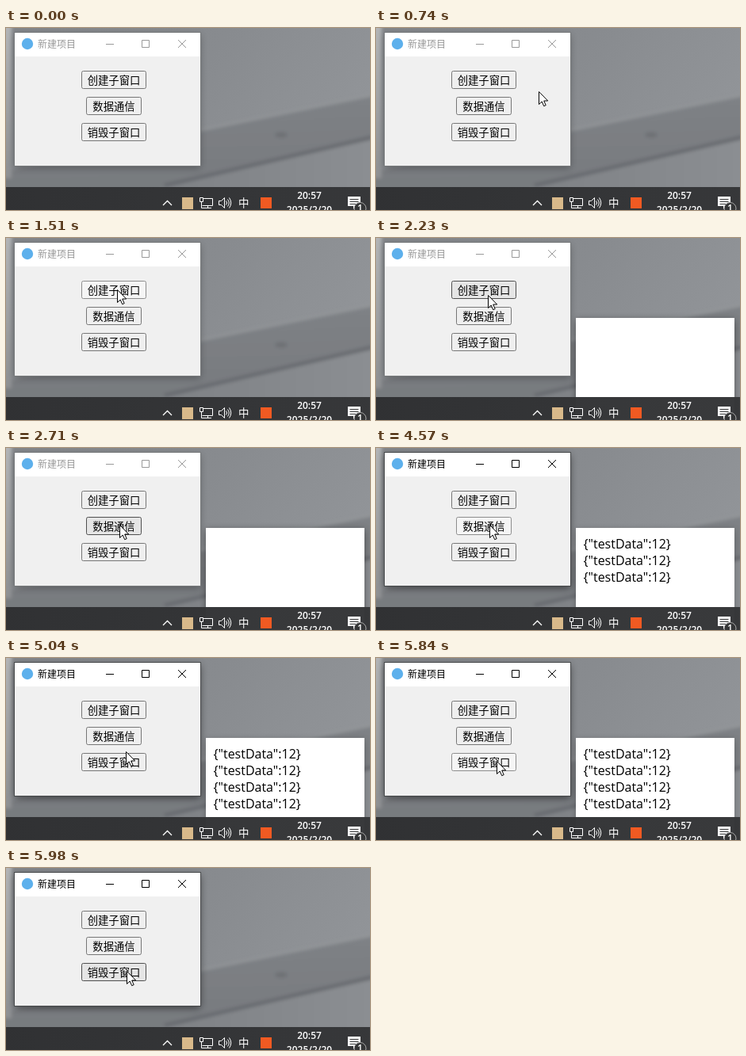
These frames come from a looping animation (459x230 px, 6040 ms). An HTML page:

```html
<!DOCTYPE html>
<html lang="zh-CN">
<head>
<meta charset="utf-8">
<title>新建项目</title>
<style>
  html, body { margin: 0; width: 100%; height: 100%; overflow: hidden; background: #85888b; }
  svg { display: block; width: 459px; height: 230px; }
  text { font-family: "Open Sans", "Noto Sans CJK SC", "Noto Sans CJK", sans-serif; }
  .cjk { font-family: "Noto Sans CJK SC", "Noto Sans CJK", sans-serif; }
  #main { --ink: #999; --edge: #77797b; }
  #main.active { --ink: #000; --edge: #47494b; }
  #main .frame { fill: var(--edge); }
  #main .title { fill: var(--ink); font-size: 12px; }
  #main .controls { fill: none; stroke: var(--ink); }
  .shadow { opacity: .28; }
  .active .shadow { opacity: .5; }
  .button rect { fill: #efefef; stroke: #767676; }
  .button.hover rect { fill: #e5e5e5; stroke: #4f4f4f; }
  .button.pressed rect { fill: #f5f5f5; stroke: #8d8d8d; }
  .button text { font-size: 13.333px; text-anchor: middle; }
  .tray { fill: none; stroke: #fff; }
  .bright { fill: #fff; font-size: 12px; font-weight: 600; text-anchor: middle; }
</style>
</head>
<body>
<svg viewBox="0 0 459 230">
  <defs>
    <linearGradient id="wall" x1="0" y1="0" x2="1" y2=".35">
      <stop offset="0" stop-color="#83868a"/>
      <stop offset=".55" stop-color="#888b8f"/>
      <stop offset="1" stop-color="#919498"/>
    </linearGradient>
    <linearGradient id="band" x1=".5" y1="0" x2=".6" y2="1">
      <stop offset="0" stop-color="#7f8286"/>
      <stop offset="1" stop-color="#75787c"/>
    </linearGradient>
    <linearGradient id="floor">
      <stop offset="0" stop-color="#747679"/>
      <stop offset=".5" stop-color="#808387"/>
      <stop offset="1" stop-color="#8c8f93"/>
    </linearGradient>
    <linearGradient id="glow" x2="0" y2="1">
      <stop offset="0" stop-color="#b4b6b8"/>
      <stop offset="1" stop-color="#8e9092"/>
    </linearGradient>
    <linearGradient id="bar">
      <stop offset="0" stop-color="#2f3032"/>
      <stop offset="1" stop-color="#353638"/>
    </linearGradient>
    <filter id="soft" x="-20%" y="-50%" width="140%" height="200%"><feGaussianBlur stdDeviation="2"/></filter>
    <filter id="blur" x="-20%" y="-20%" width="140%" height="140%"><feGaussianBlur stdDeviation="5"/></filter>
  </defs>

  <rect width="459" height="230" fill="url(#wall)"/>
  <g filter="url(#soft)">
    <path d="M-20 186L244 131 480 83V240H-20Z" fill="url(#band)"/>
    <path d="M240 130L480 81" stroke="#94979a" stroke-width="2"/>
    <path d="M-20 252L254 189 480 136V240H-20Z" fill="url(#floor)"/>
    <path d="M200 199L480 134" stroke="#686b6f" stroke-width="5"/>
    <ellipse cx="347" cy="135" rx="8" ry="3.500" fill="#6e7175"/>
    <rect x="-10" y="-10" width="17" height="200" fill="url(#glow)"/>
  </g>

  <g id="child">
    <rect class="shadow" x="253" y="104" width="198" height="150" filter="url(#blur)"/>
    <rect x="252" y="101" width="200" height="129" fill="#fff"/>
    <g id="lines" font-size="16"></g>
  </g>

  <g id="main">
    <rect class="shadow" x="11" y="9" width="234" height="168" filter="url(#blur)"/>
    <rect class="frame" x="10" y="5" width="236" height="170"/>
    <rect x="11" y="6" width="234" height="30" fill="#fff"/>
    <rect x="11" y="36" width="234" height="138" fill="#f0f0f0"/>
    <circle cx="27" cy="20" r="7.200" fill="#5db0ec"/>
    <text class="title cjk" x="40" y="24.500">新建项目</text>
    <path class="controls" d="M126 20.500H136M171.500 15.500h9v9h-9zM217 15L227 25M227 15L217 25"/>
    <g id="buttons"></g>
  </g>

  <rect y="201" width="459" height="29" fill="url(#bar)" fill-opacity=".98"/>
  <g class="tray">
    <path d="M198 224L203.500 218.500 209 224" stroke-width="1.300"/>
    <path d="M248.500 215.500H260.500V224.500H247.500M254.500 224.500V227.500M250 227.500H259M244.500 214.500H248.500V219.500H244.500ZM246.500 219.500V227.500H250"/>
    <path d="M268.500 218.500H271.500L275.500 214.500V227.500L271.500 223.500H268.500ZM277.500 218.500Q279.500 221 277.500 223.500M279.500 216.500Q283 221 279.500 225.500M281.500 214.500Q286 221 281.500 227.500"/>
  </g>
  <rect x="222" y="214" width="14" height="15" fill="#d9b98a"/>
  <rect x="321" y="214" width="14" height="14" fill="#f15a22"/>
  <text class="cjk" x="293" y="226" font-size="13.500" fill="#fff">中</text>
  <text class="bright" x="382.500" y="216">20:57</text>
  <text class="bright" x="382.500" y="234">2025/2/20</text>
  <path d="M431 213H447V225H442L438 229V225H431Z" fill="#fff"/>
  <path d="M433.500 216.500H444.500M433.500 219.500H444.500M433.500 222.500H441" stroke="#343536"/>
  <circle cx="446.500" cy="228" r="7.500" fill="#343536" stroke="#aaa"/>
  <text class="bright" x="446.500" y="232">1</text>

  <path id="cursor" d="M.5.5V16.500L4.200 13 6.700 18.700 9.200 17.600 6.700 12H11.700Z" fill="#fff" stroke="#000"/>
</svg>
<script>
const LOOP = 6040;
const TICK = 67.5;   // pointer positions advance in ticks
const H = 23;        // button height
const $ = id => document.getElementById(id);

function add(parent, tag, attrs, text = '') {
  const node = document.createElementNS('http://www.w3.org/2000/svg', tag);
  for (const key in attrs) node.setAttribute(key, attrs[key]);
  node.textContent = text;
  parent.append(node);
  return node;
}

const buttons = ['创建子窗口', '数据通信', '销毁子窗口'].map((label, i) => {
  const w = label.length > 4 ? 82 : 70;
  const x = 136 - w / 2, y = 54 + 33 * i;
  const node = add($('buttons'), 'g', { class: 'button' });
  add(node, 'rect', { x: x + .5, y: y + .5, width: w - 1, height: H - 1, rx: 2 });
  add(node, 'text', { class: 'cjk', x: 136, y: y + 16.5 }, label);
  return { node, x, y, w };
});

// The first click opens the child, the last closes it, the others send data.
const clicks = [
  { down: 1420, up: 1640 }, { down: 2840, up: 2970 }, { down: 3430, up: 3560 },
  { down: 3830, up: 3960 }, { down: 4570, up: 4640 }, { down: 5840, up: 5980 }
];
const opening = clicks[0], closing = clicks.at(-1), sends = clicks.slice(1, -1);
const messages = sends.map(({ up }, i) => ({
  at: up, node: add($('lines'), 'text', { x: 261.5, y: 127 + 21 * i }, '{"testData":12}')
}));

// Each move bends around a control point and continues from the previous one.
const entry = [466, 260];
const moves = [
  { start: 400, end: 940, bend: [191, 51], to: [154, 64] },
  { start: 1010, end: 1280, bend: [147, 61], to: [140, 65] },
  { start: 2230, end: 2710, bend: [143, 95], to: [143, 97] },
  { start: 4910, end: 5380, bend: [157, 132], to: [152, 130] }
];

function pointerAt(t) {
  const i = moves.findLastIndex(m => t >= m.start);
  if (i < 0) return null;
  const { start, end, bend, to } = moves[i];
  const from = i ? moves[i - 1].to : entry;
  const steps = Math.round((end - start) / TICK) + 1;
  const step = Math.floor((t - start + 5) / TICK) + 1;
  const u = Math.min(1, step / steps), v = 1 - u;
  return from.map((a, k) => Math.round(v * v * a + 2 * u * v * bend[k] + u * u * to[k]));
}

const within = (t, from, to) => t >= from && t < to;
const show = (node, on) => { node.style.display = on ? '' : 'none'; };

function draw(t) {
  const tip = pointerAt(t);
  const [x, y] = tip || entry;
  show($('cursor'), tip);
  $('cursor').setAttribute('transform', `translate(${x} ${y})`);

  const down = clicks.some(c => within(t, c.down, c.up));
  for (const b of buttons) {
    const over = within(x, b.x, b.x + b.w) && within(y, b.y, b.y + H);
    b.node.classList.toggle('hover', over);
    b.node.classList.toggle('pressed', over && down);
  }

  const refocus = sends[0].down;
  $('main').classList.toggle('active', within(t, opening.down, opening.down + 90) || t >= refocus);
  $('child').classList.toggle('active', t < refocus);
  show($('child'), within(t, opening.up, closing.up));
  for (const m of messages) show(m.node, t >= m.at);
}

const start = performance.now();
function tick() {
  draw((performance.now() - start) % LOOP);
  requestAnimationFrame(tick);
}
tick();
</script>
</body>
</html>
```
